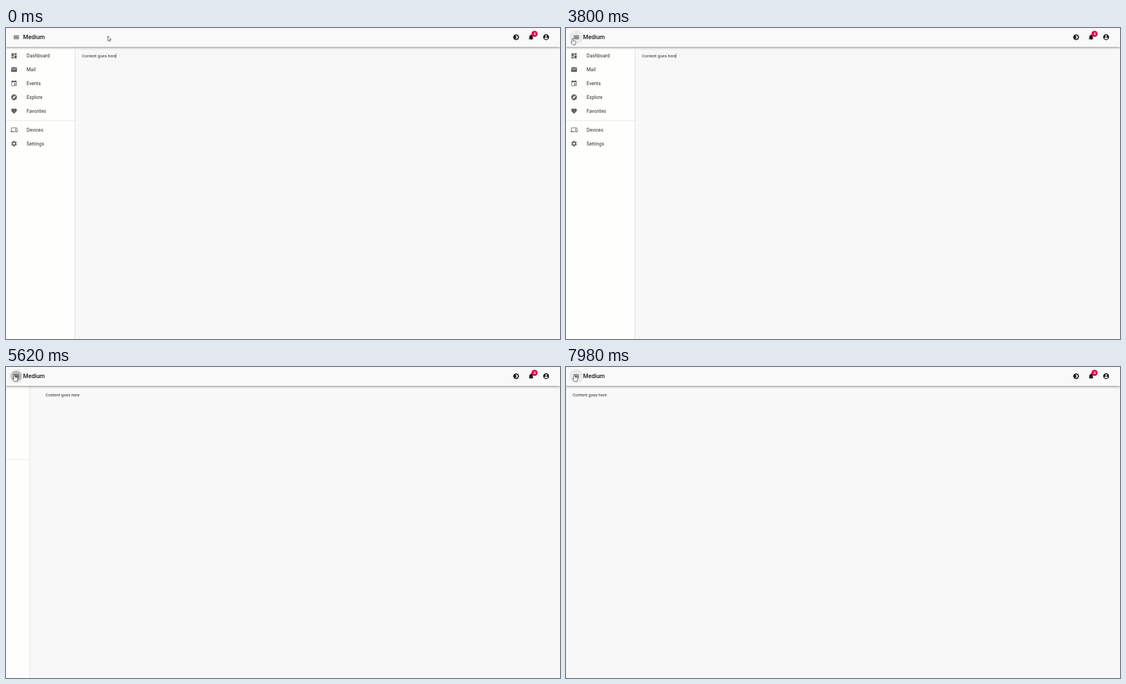
An HTML page for the animation above (8 s loop, 998 by 561 pixels).

```html
<!DOCTYPE html>
<html lang="en">
<head>
<meta charset="utf-8">
<title>Responsive drawer</title>
<style>
html, body { margin: 0; width: 100%; height: 100%; overflow: hidden; background: #f8f8f8; }
#stage { position: relative; width: 998px; height: 561px; overflow: hidden; background: #f8f8f8; }
#stage svg { position: absolute; left: 0; top: 0; }
#bar {
  position: absolute; left: 0; top: 0; width: 998px; height: 33.6px; background: #f9f9f9;
  box-shadow: 0 1.25px 2.5px -.6px rgba(0,0,0,.2), 0 2.5px 3.1px rgba(0,0,0,.14), 0 .6px 6.2px rgba(0,0,0,.12);
}
text { font-family: Roboto, sans-serif; fill: #2b2b2b; }
</style>
</head>
<body>
<div id="stage">
  <svg width="998" height="561">
    <g id="content"><text x="136.8" y="53" font-size="7.55">Content goes here</text></g>
    <rect id="caret" x="197.5" y="46.5" width="1" height="8" fill="#555"/>
    <g id="drawer">
      <rect y="33" width="124.5" height="528" fill="#fefefd"/>
      <rect x="124" y="33" width="1" height="528" fill="#dedede"/>
      <rect y="166.5" width="124" height="1" fill="#e5e5e0"/>
    </g>
  </svg>
  <div id="bar"></div>
  <svg width="998" height="561">
    <circle id="hover" cx="18.6" cy="16.6" r="12.5"/>
    <circle id="ripple" cx="18.6" cy="16.6" r="0"/>
    <g id="tools"></g>
    <text x="30.8" y="20.4" font-size="10.7" font-weight="500" style="fill:#1c1c1c">Medium</text>
    <circle cx="952.2" cy="10.5" r="5.6" fill="#e6004a"/>
    <text x="952.2" y="13" font-size="7" font-weight="500" text-anchor="middle" style="fill:#fff">4</text>
    <g stroke="#333" stroke-width=".8" stroke-linejoin="round" fill="#fff">
      <path id="arrow" d="M.4 .2V9.2L2.5 7.3 3.9 10.3 5.2 9.7 3.8 6.8H6.4Z"/>
      <path id="hand" d="M1.2 0c.8 0 1.1.5 1.1 1.2V4l3.2.6c1.1.3 1.4.9 1.3 2L6 11.5H1.2L-2 7.6c-.5-.8.5-1.5 1.3-.9L0 7.3V1.2C0 .5.4 0 1.2 0z"/>
    </g>
  </svg>
</div>
<script>
const LOOP = 8000;
const $ = id => document.getElementById(id);
const NS = 'http://www.w3.org/2000/svg';

const icons = {
  menu: 'M3 18h18v-2H3v2zm0-5h18v-2H3v2zm0-7v2h18V6H3z',
  theme: 'M20 8.69V4h-4.69L12 .69 8.69 4H4v4.69L.69 12 4 15.31V20h4.69L12 23.31 15.31 20H20v-4.69L23.31 12 20 8.69zM12 18c-.89 0-1.74-.2-2.5-.55C11.56 16.5 13 14.42 13 12s-1.44-4.5-3.5-5.45C10.26 6.2 11.11 6 12 6c3.31 0 6 2.69 6 6s-2.69 6-6 6z',
  bell: 'M12 22c1.1 0 2-.9 2-2h-4c0 1.1.89 2 2 2zm6-6v-5c0-3.07-1.64-5.64-4.5-6.32V4c0-.83-.67-1.5-1.5-1.5s-1.5.67-1.5 1.5v.68C7.63 5.36 6 7.92 6 11v5l-2 2v1h16v-1l-2-2z',
  account: 'M12 2C6.48 2 2 6.48 2 12s4.48 10 10 10 10-4.48 10-10S17.52 2 12 2zm0 3c1.66 0 3 1.34 3 3s-1.34 3-3 3-3-1.34-3-3 1.34-3 3-3zm0 14.2c-2.5 0-4.71-1.28-6-3.22.03-1.99 4-3.08 6-3.08 1.99 0 5.97 1.09 6 3.08-1.29 1.94-3.5 3.22-6 3.22z',
  Dashboard: 'M3 13h8V3H3v10zm0 8h8v-6H3v6zm10 0h8V11h-8v10zm0-18v6h8V3h-8z',
  Mail: 'M20 4H4c-1.1 0-1.99.9-1.99 2L2 18c0 1.1.9 2 2 2h16c1.1 0 2-.9 2-2V6c0-1.1-.9-2-2-2zm0 4l-8 5-8-5V6l8 5 8-5v2z',
  Events: 'M17 12h-5v5h5v-5zM16 1v2H8V1H6v2H5c-1.11 0-1.99.9-1.99 2L3 19c0 1.1.89 2 2 2h14c1.1 0 2-.9 2-2V5c0-1.1-.9-2-2-2h-1V1h-2zm3 18H5V8h14v11z',
  Explore: 'M12 10.9c-.61 0-1.1.49-1.1 1.1s.49 1.1 1.1 1.1c.61 0 1.1-.49 1.1-1.1s-.49-1.1-1.1-1.1zM12 2C6.48 2 2 6.48 2 12s4.48 10 10 10 10-4.48 10-10S17.52 2 12 2zm2.19 12.19L6 18l3.81-8.19L18 6l-3.81 8.19z',
  Favorites: 'M12 21.35l-1.45-1.32C5.4 15.36 2 12.28 2 8.5 2 5.42 4.42 3 7.5 3c1.74 0 3.41.81 4.5 2.09C13.09 3.81 14.76 3 16.5 3 19.58 3 22 5.42 22 8.5c0 3.78-3.4 6.86-8.55 11.54L12 21.35z',
  Devices: 'M4 6h18V4H4c-1.1 0-2 .9-2 2v11H0v3h14v-3H4V6zm19 2h-6c-.55 0-1 .45-1 1v10c0 .55.45 1 1 1h6c.55 0 1-.45 1-1V9c0-.55-.45-1-1-1zm-1 9h-4v-7h4v7z',
  Settings: 'M19.14 12.94c.04-.3.06-.61.06-.94 0-.32-.02-.64-.07-.94l2.03-1.58c.18-.14.23-.41.12-.61l-1.92-3.32c-.12-.22-.37-.29-.59-.22l-2.39.96c-.5-.38-1.03-.7-1.62-.94l-.36-2.54c-.04-.24-.24-.41-.48-.41h-3.84c-.24 0-.43.17-.47.41l-.36 2.54c-.59.24-1.13.57-1.62.94l-2.39-.96c-.22-.08-.47 0-.59.22L2.74 8.87c-.12.21-.08.47.12.61l2.03 1.58c-.05.3-.09.63-.09.94s.02.64.07.94l-2.03 1.58c-.18.14-.23.41-.12.61l1.92 3.32c.12.22.37.29.59.22l2.39-.96c.5.38 1.03.7 1.62.94l.36 2.54c.05.24.24.41.48.41h3.84c.24 0 .44-.17.47-.41l.36-2.54c.59-.24 1.13-.56 1.62-.94l2.39.96c.22.08.47 0 .59-.22l1.92-3.32c.12-.22.07-.47-.12-.61l-2.01-1.58zM12 15.6c-1.98 0-3.6-1.62-3.6-3.6s1.62-3.6 3.6-3.6 3.6 1.62 3.6 3.6-1.62 3.6-3.6 3.6z'
};

function add(parent, tag, attrs, label = '') {
  const el = document.createElementNS(NS, tag);
  for (const k in attrs) el.setAttribute(k, attrs[k]);
  el.textContent = label;
  parent.append(el);
}
function icon(parent, name, x, y, fill) {
  add(parent, 'path', { d: icons[name], fill, transform: `translate(${x} ${y}) scale(.525) translate(-12 -12)` });
}

[['menu', 18.6], ['theme', 918.9], ['bell', 945.9], ['account', 973]]
  .forEach(([name, x]) => icon($('tools'), name, x, 16.6, '#1c1c1c'));

['Dashboard', 'Mail', 'Events', 'Explore', 'Favorites', 'Devices', 'Settings'].forEach((name, i) => {
  const y = 50.1 + i * 24.95 + (i > 4 ? 8.8 : 0);
  icon($('drawer'), name, 14.5, y, '#646464');
  add($('drawer'), 'text', { x: 37.1, y: y + 3, 'font-size': 8.65 }, name);
});

const clamp = u => Math.min(1, Math.max(0, u));

// CSS-style cubic-bezier with y1 = 0, y2 = 1
function bezier(x1, x2) {
  return u => {
    u = clamp(u);
    let lo = 0, hi = 1, s = .5;
    for (let i = 0; i < 24; i++) {
      s = (lo + hi) / 2;
      const x = 3 * (1 - s) ** 2 * s * x1 + 3 * (1 - s) * s * s * x2 + s ** 3;
      if (x < u) lo = s; else hi = s;
    }
    return s * s * (3 - 2 * s);
  };
}
const sharp = bezier(.4, .6);
const standard = bezier(.4, .2);

// [time, x, y]
const path = [
  [0, 183, 14], [20, 183, 14], [110, 200, 14], [260, 189, 15], [1660, 189, 15],
  [1940, 176, 14], [2400, 122, 13], [2500, 116, 13], [2760, 22, 16], [2960, 3.5, 24.5],
  [3240, 3, 25], [3360, 3, 25], [3700, 9, 20], [4080, 16, 16], [4180, 16, 16], [4880, 14, 14.5]
];
function pointerAt(t) {
  const i = path.findIndex(k => k[0] > t);
  if (i < 0) return path[path.length - 1].slice(1);
  const [a, b] = [path[i - 1], path[i]];
  const u = (t - a[0]) / (b[0] - a[0]);
  return [a[1] + (b[1] - a[1]) * u, a[2] + (b[2] - a[2]) * u];
}

const PRESS = 5345, CLICK = 5504, SHIFT = 124.7;
const pauses = [[2960, 3060], [4880, 5060], [5620, 5720]];

function draw(t) {
  const pause = pauses.find(([a, b]) => t >= a && t < b);
  if (pause) t = pause[0];

  const [x, y] = pointerAt(t);
  const over = Math.hypot(x - 18.6, y - 16.6) < 12.5;
  $('arrow').setAttribute('transform', `translate(${x} ${y})`);
  $('hand').setAttribute('transform', `translate(${x} ${y})`);
  $('arrow').style.display = over ? 'none' : '';
  $('hand').style.display = over ? '' : 'none';
  $('hover').style.opacity = over ? .06 : 0;
  $('caret').style.display = t < 4500 ? '' : 'none';

  const grow = standard((t - PRESS) / 550);
  const fade = 1 - standard((t - CLICK) / 550);
  $('ripple').setAttribute('r', 12.5 * grow);
  $('ripple').style.opacity = (.1 + .2 * grow) * fade;

  $('drawer').setAttribute('transform', `translate(${-SHIFT * sharp((t - CLICK) / 195)} 0)`);
  $('content').setAttribute('transform', `translate(${-SHIFT * sharp((t - CLICK) / 225)} 0)`);
}

const start = performance.now();
function tick() {
  draw((performance.now() - start) % LOOP);
  requestAnimationFrame(tick);
}
tick();
</script>
</body>
</html>
```
